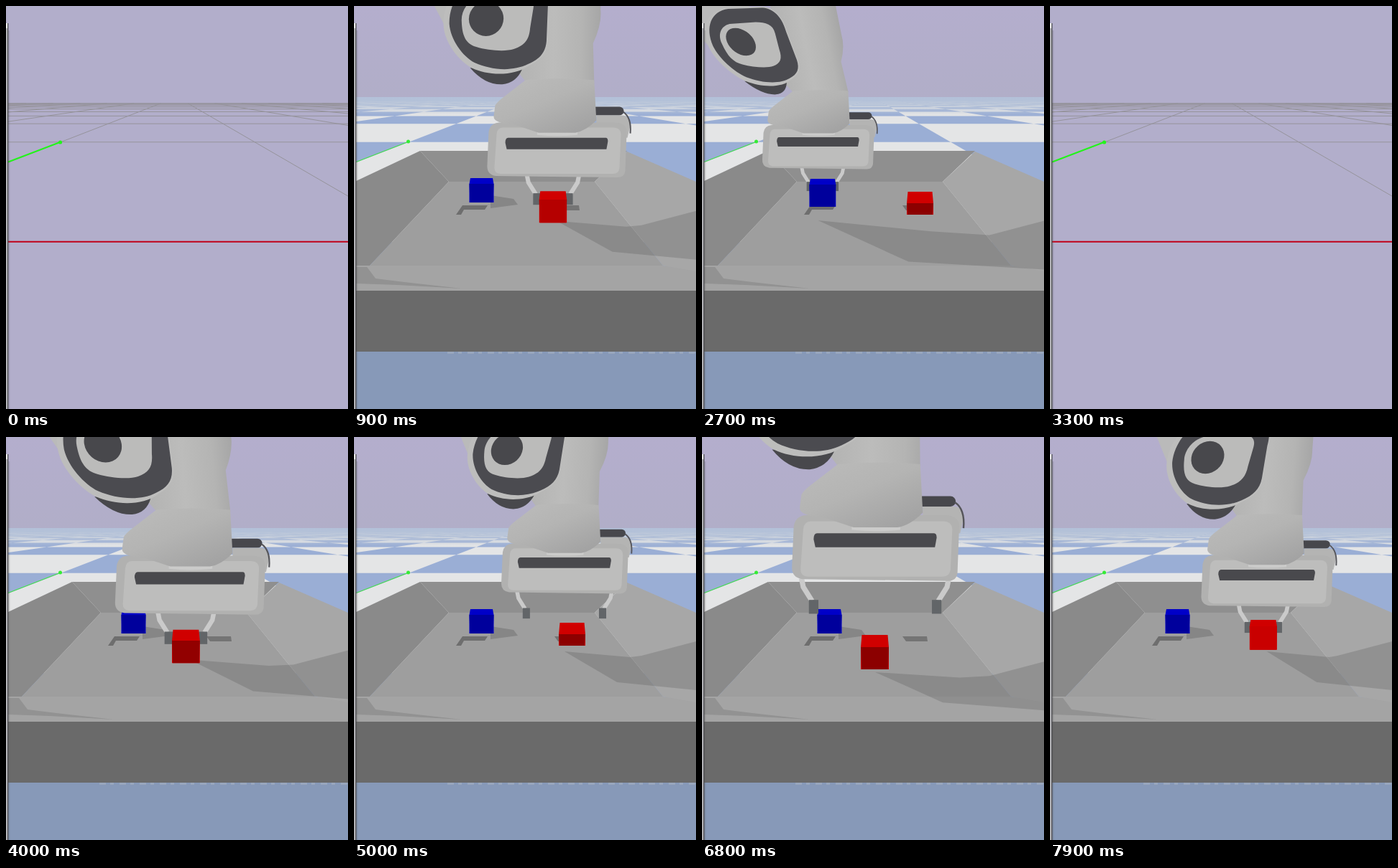
These frames come from a looping animation (476 px wide and 562 px high, 8000 ms). An HTML page:

```html
<!DOCTYPE html>
<html lang="en">
<head>
<meta charset="utf-8">
<title>Robot arm sorting cubes</title>
<style>
html, body { margin: 0; width: 100%; height: 100%; overflow: hidden; background: #b2aecb; }
svg { display: block; width: 476px; height: 562px; }
</style>
</head>
<body>
<svg viewBox="0 0 476 562">
  <defs>
    <linearGradient id="sky" x2="0" y2="1"><stop stop-color="#b4aecd"/><stop offset="1" stop-color="#b1aec8"/></linearGradient>
    <linearGradient id="haze" x2="0" y2="1"><stop stop-color="#b3c1d9"/><stop offset=".4" stop-color="#b9c5d8" stop-opacity=".8"/><stop offset="1" stop-color="#c3cbd8" stop-opacity="0"/></linearGradient>
    <linearGradient id="shell"><stop stop-color="#b0b0af"/><stop offset=".5" stop-color="#bcbcbb"/><stop offset=".8" stop-color="#b4b4b3"/><stop offset="1" stop-color="#a6a6a6"/></linearGradient>
    <linearGradient id="wrist" x2=".8" y2="1"><stop stop-color="#bcbcbb"/><stop offset=".5" stop-color="#b4b4b3"/><stop offset="1" stop-color="#a2a2a2"/></linearGradient>
    <clipPath id="trayTop"><path d="M3 244 92 202H380L476 245V397H3Z"/></clipPath>
  </defs>

  <g id="wire">
    <rect width="476" height="562" fill="#b2aecb"/>
    <path id="grid" fill="none" stroke="#95939b"/>
    <path d="M3 328.8H476" stroke="#c00018" stroke-width="2"/>
    <path d="M3 217.5 75 190" stroke="#22f51a" stroke-width="2"/>
    <circle cx="75.5" cy="190" r="2.6" fill="#22f51a"/>
  </g>

  <g id="scene">
    <rect width="476" height="128" fill="url(#sky)"/>
    <rect y="127" width="476" height="435" fill="#9aaed5"/>
    <path id="tiles" fill="#e4e5e6"/>
    <rect y="127" width="476" height="26" fill="url(#haze)"/>
    <path d="M3 217.5 75 189.5" stroke="#45df4e" stroke-width="1.3"/>
    <circle cx="75.5" cy="189" r="2.5" fill="#35ec35"/>
    <rect y="482" width="476" height="80" fill="#8799b8"/>
    <path d="M130 483.500H476" stroke="#98a6bd" stroke-width="3" stroke-dasharray="9 6 5 8"/>

    <path d="M3 244 92 202 132 245 22 362H3Z" fill="#8a8a8a"/>
    <path d="M92 202H380L335 245H132Z" fill="#8f8f8f"/>
    <path d="M380 203 476 245V372L430 362 335 245Z" fill="#a7a7a7"/>
    <path d="M132 245H335L430 362H22Z" fill="#9e9e9e"/>
    <path d="M3 362H430L476 370V397H3Z" fill="#a4a4a4"/>
    <path d="M3 364H18L30 380 70 385 150 394 60 389 3 387Z" fill="#929292"/>
    <rect x="3" y="397" width="473" height="85" fill="#6a6a6a"/>
    <path d="M142 291 151 278H186L182 284H153L149 291Z" fill="#6e6e6e"/>
    <path d="M279 278H313L314 285H284Z" fill="#747474"/>
    <g clip-path="url(#trayTop)"><path id="shade" fill="#000" opacity=".13"/></g>
    <path id="blueShade" d="M190 264 222 269 228 277 190 282Z" fill="#868686"/>

    <g id="arm">
      <g id="fingers"></g>
      <path d="M50-45H87" stroke="#47474c" stroke-width="12" stroke-linecap="round"/>
      <path d="M55-39H90Q102-39 102-25L98-8H55Z" fill="#b4b4b3"/>
      <path d="M92-44Q104-36 102-14" fill="none" stroke="#55555a" stroke-width="2"/>
      <path d="M-94-16Q-92-28-80-29L80-29Q97-29 97-16L95 38Q94 47 84 47L-84 45Q-97 43-96 30Z" fill="#b1b1b0"/>
      <path d="M-83-13Q-82-22-74-22H78Q89-22 89-12L87 34Q86 42 78 42H-78Q-87 41-86 32Z" fill="#bdbdbc"/>
      <path d="M-67-8H68Q71-8 71-3L69 8H-69L-71-1Q-71-8-67-8Z" fill="#49494d"/>
      <path d="M-27-20H29V-12Q0-9-27-12Z" fill="#cbcbca"/>
      <g id="forearm">
        <path d="M-40-320H60V-185Q62-165 50-139L52-86H-43L-70-120Z" fill="url(#shell)"/>
      </g>
      <g id="elbow">
        <path d="M-190-225-178-203-135-125-60-160-60-320H-190Z" fill="#bababa"/>
        <path d="M-120-105Q-99-81-75-82-56-84-48-103Z" fill="#48484c"/>
        <path d="M-98-232C-135-228-160-200-158-165-157-140-135-114-118-105-95-94-60-93-38-108-22-116-14-125-13-140L-12-190C-8-225-25-234-40-234Z" fill="#bdbdbc"/>
        <path d="M-98-230C-130-226-151-198-150-166-148-144-131-121-114-112-92-102-62-99-40-110-24-117-16-126-15-142L-14-190C-10-223-25-232-40-232Z" fill="#4b4b50"/>
        <path d="M-106-204C-124-200-134-185-133-170-132-148-126-138-112-134-96-129-72-127-60-131-45-136-39-144-38-160L-34-188C-32-203-42-207-60-207Z" fill="#bbbbba"/>
        <circle cx="-99" cy="-173" r="24" fill="#48484c"/>
      </g>
      <path d="M-43-88Q5-92 52-88L55-32Q40-17 26-15H-25L-58-26Q-88-28-87-38L-85-53Q-82-58-74-64Z" fill="url(#wrist)"/>
    </g>
    <g id="blue"></g>
    <g id="red"></g>
  </g>

  <rect y="24" width="2" height="538" fill="#b4b4b8"/>
  <rect y="24" width="2" height="7" fill="#fff"/>
  <rect x="2" y="24" width="1.300" height="538" fill="#4c4c50"/>
  <rect x="3.300" y="34" width="2" height="528" fill="#555" opacity=".2"/>
</svg>
<script>
const $ = id => document.getElementById(id);
const HORIZON = 127, VANISH = 238, LOOP = 8000, STEP = 100;

const mix = (a, b, k) => a + (b - a) * k;
const ramp = (t, from, to) => Math.min(1, Math.max(0, (t - from) / (to - from)));

// Ground plane: row lines by depth, column lines fanning out of the vanishing point.
const rowY = n => HORIZON + 91 / (n + 0.45);
const colX = (m, y) => VANISH + (y - HORIZON) * (4.3 * m - 2.577);

function buildGround() {
  let grid = '', tiles = '';
  for (let n = 1; n <= 10; n++) grid += `M3 ${rowY(n)}H476`;
  for (let m = -10; m <= 11; m++) grid += `M${colX(m, rowY(10))} ${rowY(10)}L${colX(m, 330)} 330`;
  for (let n = 0; n < 16; n++) {
    const near = rowY(n), far = rowY(n + 1);
    for (let m = -26; m < 26; m++) {
      if ((m + n) % 2) continue;
      tiles += `M${colX(m, near)} ${near}L${colX(m, far)} ${far}L${colX(m + 1, far)} ${far}L${colX(m + 1, near)} ${near}Z`;
    }
  }
  $('grid').setAttribute('d', grid);
  $('tiles').setAttribute('d', tiles);
}

// Cubes stand at start, are carried between grab and drop, then sit in their slot.
// grip is where the fingers hold the cube, in hand units.
const RED = {
  start: { x: 240.5, y: 300, w: 39, h: 48, top: 17 },
  slot: { x: 303.5, y: 275, w: 37, h: 32, top: 16 },
  grab: 200, drop: 1200, grip: -5
};
const BLUE = {
  start: { x: 177.5, y: 257, w: 34, h: 34, top: 8 },
  slot: { x: 164, y: 275, w: 38, h: 32, top: 15 },
  grab: 2300, drop: 2720, grip: 8
};
const GRIP_Y = 88, HAND_UNIT = 141;

// Hand pose that holds a cube standing at a spot.
function reach(spot, grip, width, lean) {
  const s = width / HAND_UNIT;
  return { x: spot.x - grip * s, y: spot.y - GRIP_Y * s, width, lean };
}
const HOME = { x: 241, y: 144, width: 170, lean: 5 };
const AWAY = { x: 158, y: 155, width: 116, lean: -33 };
const RED_GRAB = reach(RED.start, -2, 158, -20);
const RED_DROP = reach(RED.slot, RED.grip, 131, 16);
const BLUE_GRAB = reach(BLUE.start, BLUE.grip, 113, -24);
const BLUE_DROP = reach(BLUE.slot, BLUE.grip, 114, -38);

const LEGS = [
  { begin: 0, end: RED.grab, from: HOME, to: RED_GRAB, lift: 0 },
  { begin: RED.grab, end: RED.drop, from: RED_GRAB, to: RED_DROP, lift: 5 },
  { begin: 1300, end: 2200, from: RED_DROP, to: BLUE_GRAB, lift: 50 },
  { begin: BLUE.grab, end: BLUE.drop, from: BLUE_GRAB, to: BLUE_DROP, lift: 12 },
  { begin: 2850, end: 3100, from: BLUE_DROP, to: AWAY, lift: 0 }
];

function handAt(phase) {
  const { begin, end, from, to, lift } = LEGS.filter(leg => leg.begin <= phase).pop();
  const k = ramp(phase, begin, end);
  const hand = {};
  for (const key in from) hand[key] = mix(from[key], to[key], k);
  hand.y -= lift * Math.sin(Math.PI * k);
  hand.scale = hand.width / HAND_UNIT;
  const closed = [RED, BLUE].reduce((sum, { grab, drop }) =>
    sum + ramp(phase, grab - 100, grab) - ramp(phase, drop, drop + 100), 0);
  hand.open = mix(phase < RED.drop ? 71 : 58, 22, closed);
  hand.offset = closed * (phase < 1500 ? RED.grip : BLUE.grip);
  return hand;
}

function cubeAt({ start, slot, grab, drop, grip }, hand, phase) {
  if (phase <= grab) return start;
  if (phase >= drop) return slot;
  const k = ramp(phase, grab, drop);
  return {
    x: hand.x + grip * hand.scale,
    y: hand.y + GRIP_Y * hand.scale,
    w: mix(start.w, 38, k),
    h: mix(start.h, 41, k),
    top: mix(start.top, 8, k)
  };
}

function drawCube(id, { x, y, w, h, top }, light, front) {
  const l = x - w / 2, r = x + w / 2, t = y - h / 2, b = y + h / 2;
  $(id).innerHTML =
    `<path d="M${l + 1.5} ${t}H${r - 1.5}L${r} ${t + top}V${b}H${l}V${t + top}Z" fill="${light}"/>` +
    `<path d="M${l} ${t + top}H${r}L${r - 1} ${b}H${l + 1}Z" fill="${front}"/>`;
}

// Shear that keeps the wrist joint in place.
const shear = k => `matrix(1 0 ${-k} 1 ${-88 * k} 0)`;

function drawArm({ x, y, scale, lean, open, offset }) {
  $('arm').setAttribute('transform', `translate(${x} ${y}) scale(${scale})`);
  $('elbow').setAttribute('transform', shear(lean / 85));
  $('forearm').setAttribute('transform', shear(lean / 170));
  $('fingers').innerHTML = [-1, 1].map(side => {
    const px = offset + side * open;
    return `<path d="M${px + side * 14} 44L${px + side * 12} 54L${px + side * 2} 70" fill="none" stroke="#cacaca" stroke-width="6"/>` +
      `<rect x="${px - 5.5}" y="69" width="11" height="16" fill="#626568"/>`;
  }).join('');
}

function drawShade({ x, width }) {
  const near = Math.max(0, width - HAND_UNIT);
  const tip = 299 + near, edge = 285 + near * 0.8 + Math.max(0, 283 - x) * 0.12;
  const along = k => mix(x, 476, k);
  $('shade').setAttribute('d',
    `M${x} ${tip}L${along(0.5)} ${mix(tip, edge + 30, 0.5)}L400 ${edge + 20}L476 ${edge}V${edge + 68}` +
    `L${along(0.4)} ${edge + 57}L${along(0.2)} ${mix(tip, edge + 57, 0.5)}Z`);
}

function phaseAt(t) {
  if (t < 100) return -1;
  if (t < 3300) return t - 100;
  if (t < 3600) return -1;
  if (t < 6700) return t - 3600;
  return t < 6800 ? -1 : t - 6800;
}

function render(time) {
  const phase = phaseAt(Math.floor((time % LOOP) / STEP) * STEP);
  const empty = phase < 0;
  $('wire').style.display = empty ? '' : 'none';
  $('scene').style.display = empty ? 'none' : '';
  if (empty) return;

  const hand = handAt(phase);
  // The red front catches more light as it is carried and darkens in its slot.
  const glow = phase < RED.drop ? Math.sin(ramp(phase, RED.grab, RED.drop) * Math.PI / 2) ** 2 : 0;
  drawArm(hand);
  drawShade(hand);
  drawCube('red', cubeAt(RED, hand, phase), '#d00000', `rgb(${mix(140, 203, glow)} 0 0)`);
  drawCube('blue', cubeAt(BLUE, hand, phase), '#0000c8', '#00009c');
  $('blueShade').style.display = phase < BLUE.grab ? '' : 'none';
  if (phase < 2100) $('arm').before($('blue'));
  else $('arm').after($('blue'));
}

buildGround();
const start = performance.now();
function tick() {
  render(performance.now() - start);
  requestAnimationFrame(tick);
}
tick();
</script>
</body>
</html>
```
